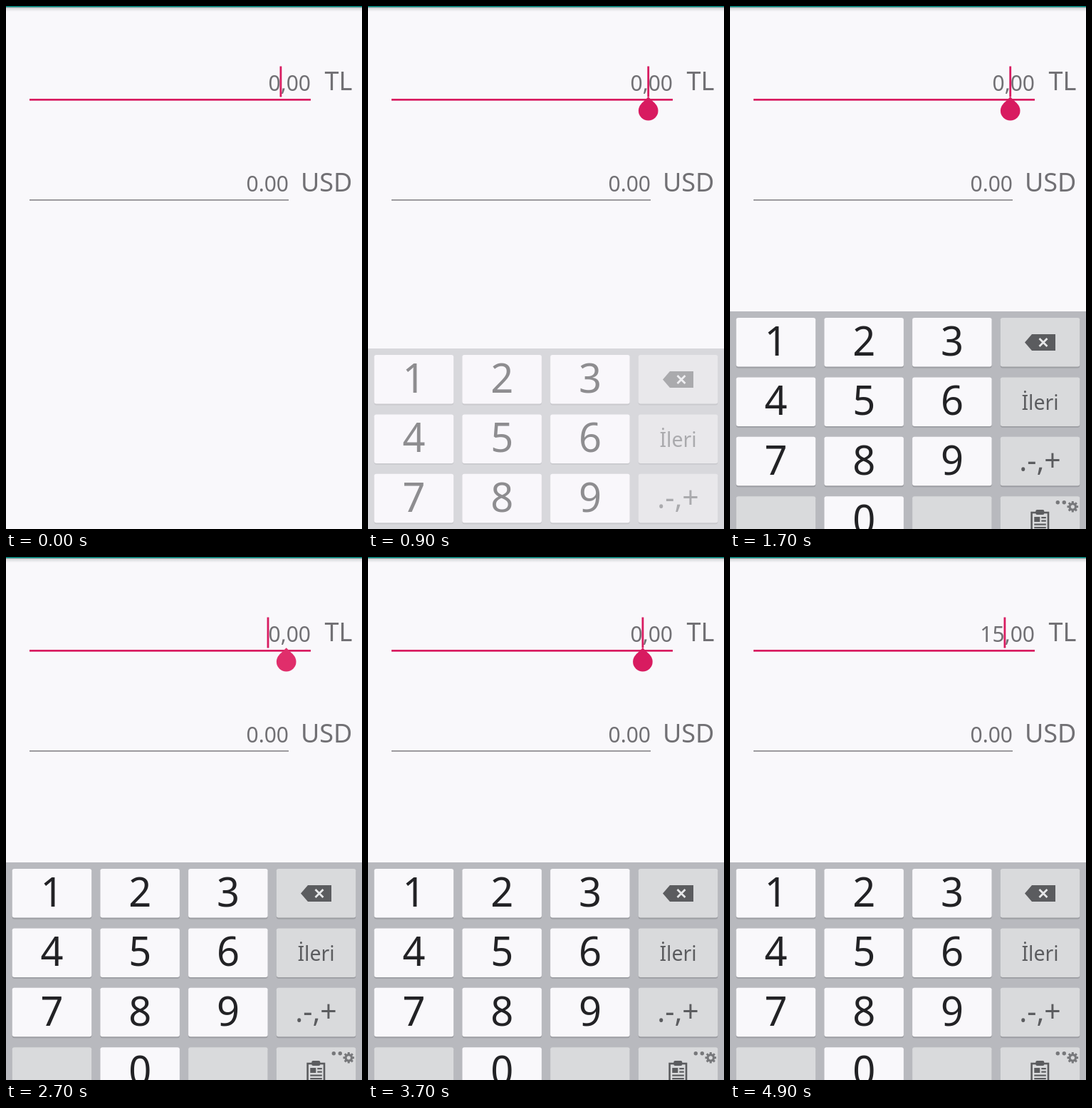
Write an HTML page with a canvas that moves like this. It is 500 by 733 pixels and loops after 5 s.

```html
<!DOCTYPE html>
<html lang="tr">
<head>
<meta charset="utf-8">
<title>Currency converter</title>
<style>
html, body { margin: 0; width: 100%; height: 100%; overflow: hidden; background: #f9f8fb; }
canvas { display: block; }
</style>
</head>
<body>
<canvas id="stage" width="500" height="733"></canvas>
<script>
const W = 500, H = 733, LOOP = 5000, TICK = 100;
const PAGE = '#f9f8fb', PINK = '#d81b60', GREY = '#717074', INK = '#5b5c5f', KEY = '#d9dadc';
const FONT = '"Noto Sans", "Open Sans", sans-serif';
const ctx = document.getElementById('stage').getContext('2d');

// Input state changes: time, amount, caret x, handle x, handle pressed
const steps = [
  [0, '0,00', 385.9, 0],
  [200, '0,00', 0, 0],
  [700, '0,00', 393.7, 393.7],
  [1200, '0,00', 0, 393.7],
  [1700, '0,00', 393.7, 393.7],
  [2200, '0,00', 0, 393.7],
  [2700, '0,00', 368, 393.7, true],
  [2800, '0,00', 368, 368, true],
  [3200, '0,00', 0, 368, true],
  [3400, '0,00', 385.9, 368, true],
  [3500, '0,00', 385.9, 385.9, true],
  [3700, '0,00', 385.9, 385.9],
  [3900, '0,00', 0, 385.9],
  [4300, '1,00', 385.9, 0],
  [4700, '15,00', 385.9, 0]
];

function rect(x, y, w, h, color) {
  ctx.fillStyle = color;
  ctx.fillRect(x, y, w, h);
}

function round(x, y, w, h, r, color) {
  ctx.fillStyle = color;
  ctx.beginPath();
  ctx.roundRect(x, y, w, h, r);
  ctx.fill();
}

function disc(x, y, r, color) {
  ctx.fillStyle = color;
  ctx.beginPath();
  ctx.arc(x, y, r, 0, 2 * Math.PI);
  ctx.fill();
}

function text(s, x, y, size, color, align = 'center', weight = 400) {
  ctx.font = `${weight} ${size}px ${FONT}`;
  ctx.fillStyle = color;
  ctx.textAlign = align;
  ctx.fillText(s, x, y);
}

function drawForm(amount) {
  rect(0, 0, W, H, PAGE);
  const shade = ctx.createLinearGradient(0, 1, 0, 8);
  shade.addColorStop(0, 'rgba(60,70,72,.45)');
  shade.addColorStop(0.4, 'rgba(60,70,72,.14)');
  shade.addColorStop(1, 'rgba(60,70,72,0)');
  rect(0, 1, W, 7, shade);
  rect(0, 0, W, 1.6, '#00857a');

  text(amount, 428, 118.6, 30, GREY, 'right');
  text('TL', 486.4, 118, 36, GREY, 'right');
  rect(33, 130, 395, 2.7, PINK);
  text('0.00', 397, 260, 30, GREY, 'right');
  text('USD', 486.4, 259.5, 36, GREY, 'right');
  rect(33, 271, 364, 1.8, '#929195');
}

// Teardrop: a disc plus a square corner pointing up
function drawHandle(x, pressed) {
  const y = 146.8, r = 13.8, color = pressed ? '#e02e6b' : PINK;
  disc(x, y, r, color);
  ctx.save();
  ctx.translate(x, y);
  ctx.rotate(-Math.PI / 4);
  rect(0, -r, r, r, color);
  ctx.restore();
}

function drawBackspace(x, y) {
  ctx.fillStyle = INK;
  ctx.beginPath();
  ctx.moveTo(x - 21, y);
  ctx.lineTo(x - 11, y - 11.5);
  ctx.lineTo(x + 22, y - 11.5);
  ctx.lineTo(x + 22, y + 11.5);
  ctx.lineTo(x - 11, y + 11.5);
  ctx.fill();
  ctx.strokeStyle = '#e6e7e9';
  ctx.lineWidth = 2.8;
  ctx.beginPath();
  ctx.moveTo(x - 0.5, y - 5.5);
  ctx.lineTo(x + 10.5, y + 5.5);
  ctx.moveTo(x + 10.5, y - 5.5);
  ctx.lineTo(x - 0.5, y + 5.5);
  ctx.stroke();
}

function drawClipboard(x, y) {
  ctx.strokeStyle = INK;
  ctx.lineWidth = 2.6;
  ctx.strokeRect(x - 11.7, y + 4, 23.4, 28);
  round(x - 6, y, 12, 7, 2, INK);
  rect(x - 8, y + 10, 8, 7, INK);
  for (const dy of [10, 14.5]) rect(x + 2, y + dy, 6.5, 2.2, INK);
  for (const dy of [19.5, 24]) rect(x - 8, y + dy, 16.5, 2.2, INK);
}

function drawGear(x, y) {
  const color = '#77787b';
  ctx.strokeStyle = color;
  ctx.lineWidth = 3;
  ctx.beginPath();
  for (let i = 0; i < 8; i++) {
    const a = i * Math.PI / 4;
    ctx.moveTo(x + 4 * Math.cos(a), y + 4 * Math.sin(a));
    ctx.lineTo(x + 7.8 * Math.cos(a), y + 7.8 * Math.sin(a));
  }
  ctx.stroke();
  disc(x, y, 5.8, color);
  disc(x, y, 2.6, KEY);
  for (const dx of [21, 12]) disc(x - dx, y - 6, 2.7, color);
}

function drawKeyboard(t) {
  const u = Math.min(1, (t - 775) / 250);
  if (u <= 0) return;
  ctx.save();
  ctx.translate(0, 428 + 208 * (1 - u) ** 2);
  rect(0, 0, W, H, '#b8b9be');
  const labels = ['1', '2', '3', '', '4', '5', '6', 'İleri', '7', '8', '9', '.-,+', '', '0', '', ''];
  labels.forEach((label, i) => {
    const x = 8.7 + i % 4 * 123.7, y = 9 + Math.floor(i / 4) * 83.4;
    const digit = /^\d$/.test(label);
    round(x, y + 1.6, 111.5, 68.8, 3, '#9c9da2');
    round(x, y, 111.5, 68.5, 3, digit ? PAGE : KEY);
    if (digit) text(label, x + 55.8, y + 53, 56, '#222225');
  });
  text('İleri', 435.5, 138, 28.5, INK, 'center', 500);
  text('.-,+', 435.5, 223.5, 41, INK, 'center', 500);
  drawBackspace(435, 43.5);
  drawClipboard(435.3, 278);
  drawGear(481.3, 273.8);
  // Fade in by thinning a page-coloured veil
  ctx.globalAlpha = 1 - u;
  rect(0, 0, W, H, PAGE);
  ctx.restore();
}

function draw(now) {
  const t = Math.floor(now % LOOP / TICK) * TICK;
  const [, amount, caret, handle, pressed] = steps.findLast(s => s[0] <= t);
  drawForm(amount);
  if (caret) rect(caret - 1.4, 84.5, 2.8, 43, PINK);
  if (handle) drawHandle(handle, pressed);
  drawKeyboard(t);
}

const start = performance.now();
function loop() {
  draw(performance.now() - start);
  requestAnimationFrame(loop);
}
loop();
</script>
</body>
</html>
```
